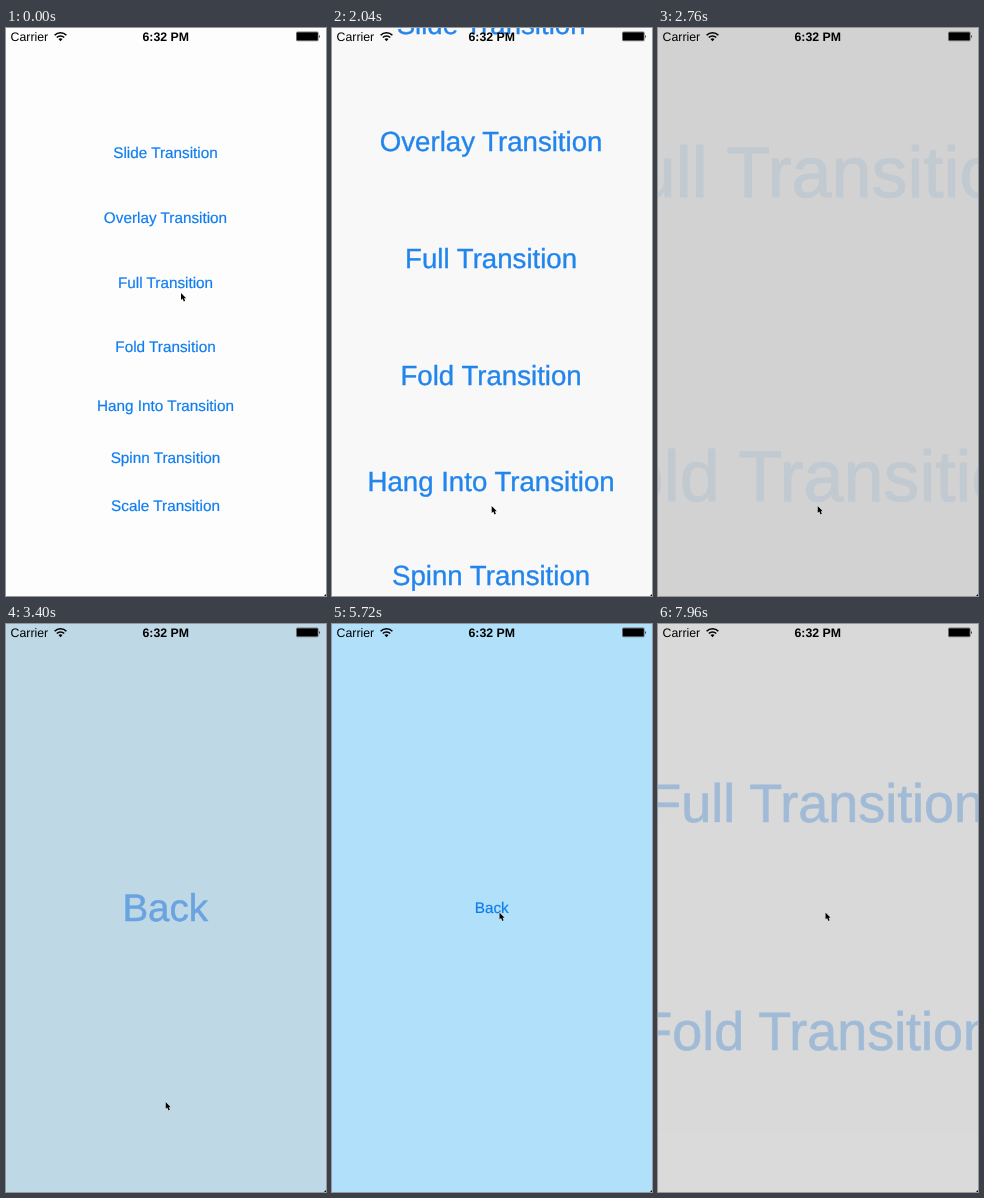
Animation of 320x568 px, one loop 8000 ms. Source, as an HTML page:

```html
<!DOCTYPE html>
<html lang="en">
<head>
<meta charset="utf-8">
<style>
html, body { margin: 0; width: 100%; height: 100%; overflow: hidden; background: #cfcfcf; }
svg { display: block; width: 100%; height: 100%; }
text { font-family: "Liberation Sans", Arial, sans-serif; text-rendering: geometricPrecision; }
.page text { font-size: 15.3px; text-anchor: middle; fill: #0f7df0; stroke: #0f7df0; stroke-width: 0.2px; }
.status text { font-size: 12.3px; }
</style>
</head>
<body>
<svg viewBox="0 0 320 568">
  <rect width="320" height="568" fill="#cfcfcf"/>
  <g class="page" id="menu">
    <rect width="320" height="568" fill="#fdfdfd"/>
    <g id="items"></g>
  </g>
  <g class="page" id="detail">
    <rect width="320" height="568" fill="#b0e0fa"/>
    <text id="back" x="159.7" y="289">Back</text>
  </g>
  <g class="status">
    <text x="4.6" y="12.6">Carrier</text>
    <g fill="none" stroke="#000" stroke-width="1.6">
      <path d="M48.6 7.2a8.3 8.3 0 0 1 11.8 0"/>
      <path d="M50.8 9.5a5.2 5.2 0 0 1 7.4 0"/>
    </g>
    <path d="M54.5 13.2l-2-2.1a2.9 2.9 0 0 1 4 0z"/>
    <text x="159.7" y="12.6" text-anchor="middle" font-weight="bold">6:32 PM</text>
    <rect x="290" y="3.6" width="22.6" height="9.6" rx="1.5" fill="#777"/>
    <rect x="290.9" y="4.5" width="20.8" height="7.8" rx="0.8"/>
    <path d="M313.2 6.7q1.6 1.7 0 3.5z"/>
  </g>
  <path d="M320 566v2h-2z"/>
  <path id="cursor" d="M0 0v7l1.6-1.4 1.2 2.8 1.4-.6-1.2-2.6h2.1z" stroke="#fff" stroke-width="0.7" paint-order="stroke"/>
</svg>
<script>
const LOOP = 8000, PHASE = 1000, GROWTH = 3.95;
const FORWARD = 1880, RETURN = 6670;
const $ = id => document.getElementById(id);
const clamp = v => Math.max(0, Math.min(1, v));
const span = (t, from, to) => clamp((t - from) / (to - from));
const mix = (a, b, k) => a + (b - a) * k;
const smooth = p => p * p * (3 - 2 * p);

const rows = [
  ["Slide", 130], ["Overlay", 195], ["Full", 259.6], ["Fold", 324.3],
  ["Hang Into", 383], ["Spinn", 435], ["Scale", 482.6]
];
const labels = rows.map(([name, y]) => {
  const el = document.createElementNS("http://www.w3.org/2000/svg", "text");
  el.setAttribute("x", 159.5);
  el.setAttribute("y", y);
  el.textContent = name + " Transition";
  $("items").append(el);
  return el;
});
const scaleLabel = labels[labels.length - 1];

// Cursor stops: time, x, y
const stops = [
  [0, 175, 265], [40, 175, 265], [840, 159.7, 478], [880, 153, 478], [920, 157.5, 478],
  [1320, 157.5, 478], [1360, 159.4, 478], [1400, 159.7, 478], [4440, 159.7, 478],
  [5240, 167.5, 297], [5720, 167.5, 288.5], [LOOP, 167.5, 288.5]
];

function cursorAt(t) {
  const i = Math.max(1, stops.findIndex(s => s[0] >= t));
  const [t0, x0, y0] = stops[i - 1], [t1, x1, y1] = stops[i];
  const k = smooth(span(t, t0, t1));
  const bulge = i === 2 ? 7 * Math.sin(Math.PI * k) : 0;
  return [mix(x0, x1, k) + bulge, mix(y0, y1, k)];
}

function zoom(page, scale, alpha) {
  page.setAttribute("transform", `translate(160 284) scale(${scale}) translate(-160 -284)`);
  page.setAttribute("opacity", alpha);
  page.setAttribute("visibility", alpha > 0 ? "visible" : "hidden");
}

const grow = p => 1 - Math.pow(1 - p, 1.3);
const fade = p => mix(p, smooth(p), 0.65);
const leave = (page, p) => zoom(page, 1 + GROWTH * grow(p), 1 - fade(p));
const enter = (page, p) => zoom(page, 1 + GROWTH * (1 - grow(p)), fade(p));

// Touch highlight: drops at once, recovers after release
const press = (t, down, up) => t < down ? 1 : mix(0.2, 1, span(t, up, up + 400));

function draw(t) {
  const out = start => span(t, start, start + PHASE);
  const into = start => span(t, start + PHASE, start + 2 * PHASE);
  if (t < RETURN) {
    leave($("menu"), out(FORWARD));
    enter($("detail"), into(FORWARD));
  } else {
    leave($("detail"), out(RETURN));
    enter($("menu"), into(RETURN));
  }
  scaleLabel.setAttribute("opacity", press(t, 1720, 1900));
  $("back").setAttribute("opacity", press(t, 6480, 6660));
  $("cursor").setAttribute("transform", `translate(${cursorAt(t)})`);
}

const began = performance.now();
function tick() {
  draw((performance.now() - began) % LOOP);
  requestAnimationFrame(tick);
}
tick();
</script>
</body>
</html>
```
